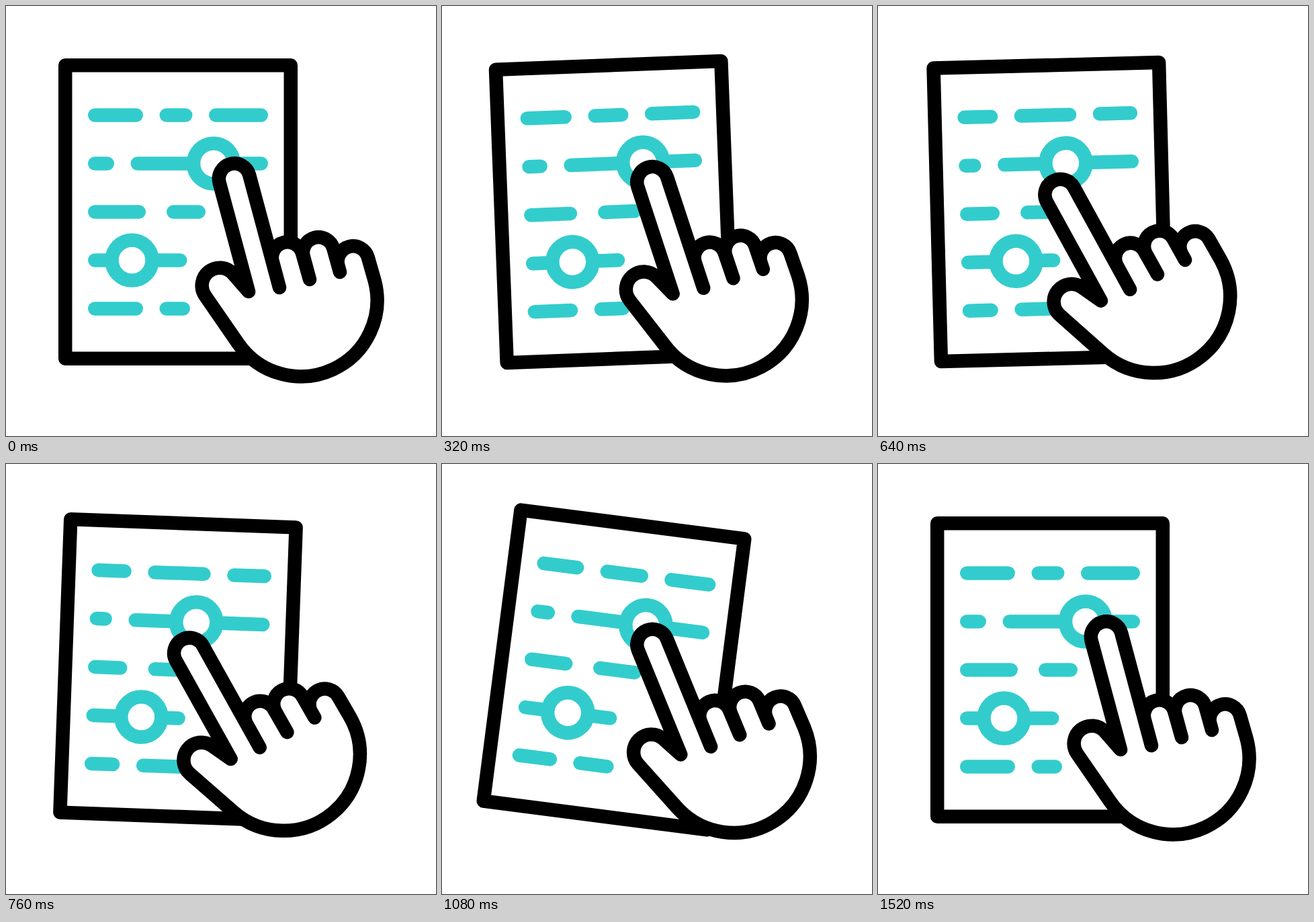
Write an HTML page that moves like this. It is 640 px wide and 640 px high and loops after 2 s.

```html
<!DOCTYPE html>
<html lang="en">
<head>
<meta charset="utf-8">
<title>Adjusting sliders</title>
<style>
  html, body { margin: 0; width: 100%; height: 100%; overflow: hidden; background: #fff; }
  svg { display: block; width: 100vw; height: 100vh; }
  g, path { fill: #fff; stroke: #000; stroke-width: 20.5; stroke-linejoin: round; stroke-linecap: round; }
  #dials { stroke: #3cc; }
</style>
</head>
<body>
<svg viewBox="0 0 640 640">
  <g id="sheet">
    <rect x="88.2" y="88.2" width="335.6" height="436.6"/>
    <g id="dials"></g>
  </g>
  <path id="hand" d="M296.2 431A26.5 26.5 0 0 1 338 398.6L361 425
    L317.6 263A23 23 0 0 1 362 251L407 419
    L396.6 380A23 23 0 0 1 441 368L452 407
    L442.8 373A23 23 0 0 1 487.3 361L497 396
    L494.3 386A23 23 0 0 1 538.7 374
    L548.6 408.6A113.5 113.5 0 0 1 345.7 502.6Z"/>
</svg>
<script>
const LOOP = 2000, STEP = 40;
const LEFT = 122, TOP = 162.5, PITCH = 72, CAP = 10.25;
const sheet = document.getElementById('sheet');
const dials = document.getElementById('dials');
const hand = document.getElementById('hand');

// Each row is one bar, cut by gaps that slide along it
const gap = (x, travel, width = 24.5) => ({ x, travel, width });
const knob = (x, travel) => ({ x, travel });
const rows = [
  { end: 390, gaps: [gap(204, -22.5), gap(277.5, 22)] },
  { end: 390, gaps: [gap(161, -5.8)], knob: knob(309, -28.3) },
  { end: 297, gaps: [gap(208, -27.5, 31)] },
  { end: 269.5, gaps: [], knob: knob(187.5, 16.4) },
  { end: 274, gaps: [gap(204, -29.5)] }
];

function set(el, attrs) {
  for (const k in attrs) el.setAttribute(k, attrs[k]);
}
function add(tag, attrs) {
  const el = document.createElementNS('http://www.w3.org/2000/svg', tag);
  set(el, attrs);
  return dials.appendChild(el);
}

rows.forEach((row, i) => {
  const y = TOP + PITCH * i;
  row.bars = [...row.gaps, null].map(() => add('line', { y1: y, y2: y }));
  if (row.knob) row.ring = add('circle', { cy: y, r: 30 });
});

// Ease-in-out, cubic-bezier(.42, 0, .58, 1), solved by bisection
function ease(u) {
  let lo = 0, hi = 1;
  for (let i = 0; i < 24; i++) {
    const s = (lo + hi) / 2, r = 1 - s;
    const x = 1.26 * s * r * r + 1.74 * s * s * r + s * s * s;
    if (x < u) lo = s; else hi = s;
  }
  return lo * lo * (3 - 2 * lo);
}
const ramp = (t, from, to) => ease(Math.min(1, Math.max(0, (t - from) / (to - from))));
// Out, hold and back again
const pulse = (t, a, b, c, d) => ramp(t, a, b) - ramp(t, c, d);

function draw(t) {
  const q = pulse(t, 120, 700, 750, 1420);
  for (const { end, gaps, bars, knob, ring } of rows) {
    let x = LEFT;
    bars.forEach((bar, i) => {
      const g = gaps[i];
      const stop = g ? g.x + g.travel * q : end;
      set(bar, { x1: x + CAP, x2: stop - CAP });
      if (g) x = stop + g.width;
    });
    if (ring) set(ring, { cx: knob.x + knob.travel * q });
  }

  const tilt = -3 * pulse(t, 0, 500, 500, 1030) + 7.5 * pulse(t, 500, 1030, 1030, 1500);
  const turn = -14.2 * pulse(t, 130, 710, 775, 1390);
  const shift = -38.5 * pulse(t, 120, 520, 640, 1325);
  set(sheet, { transform: `rotate(${tilt} 256 306.5)` });
  set(hand, { transform: `translate(${shift} 0) rotate(${turn} 422 393)` });
}

const start = performance.now();
function tick() {
  const t = (performance.now() - start) % LOOP;
  draw(Math.floor(t / STEP) * STEP);
  requestAnimationFrame(tick);
}
draw(0);
requestAnimationFrame(tick);
</script>
</body>
</html>
```
